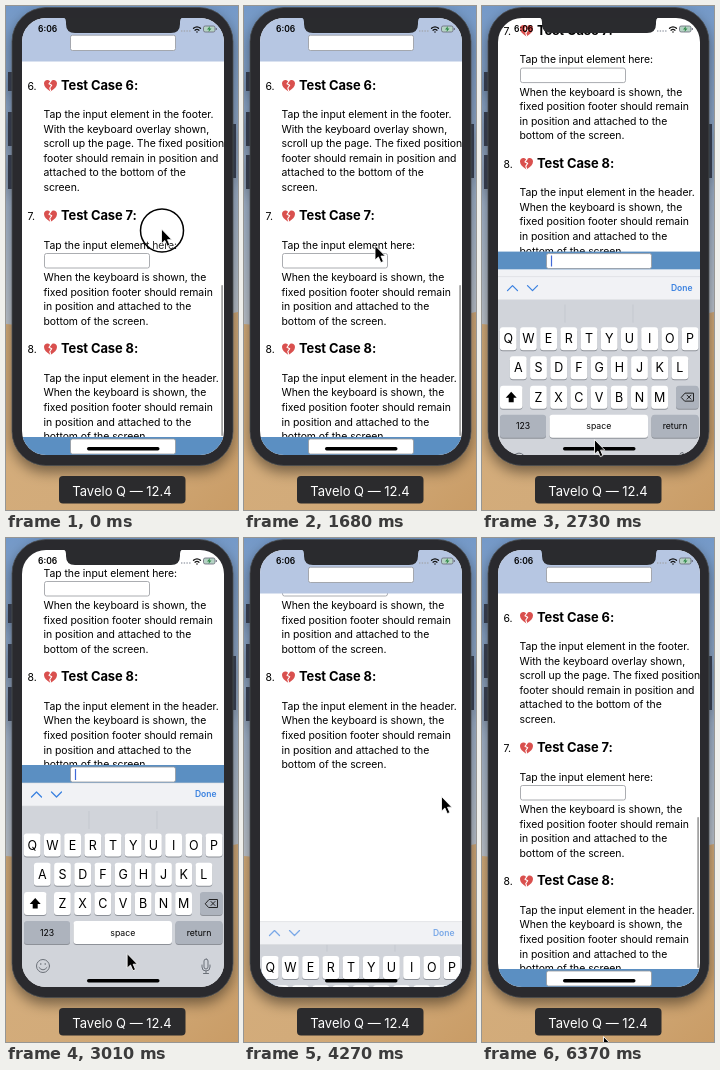
Write an HTML page that moves like this. It is 232x504 px and loops after 6.44 s.

```html
<!DOCTYPE html>
<html lang="en">
<head>
<meta charset="utf-8">
<title>Fixed footer test</title>
<style>
html, body { margin: 0; width: 100%; height: 100%; overflow: hidden; }
svg { display: block; width: 232px; height: 504px; font: 10.45px Inter, sans-serif; }
text { white-space: pre; }
#page text { letter-spacing: -.005em; }
#page .head { font-weight: 700; font-size: 12.9px; }
.field { fill: #fff; stroke: #96999e; stroke-width: .8; }
.key { fill: #fff; }
.dark { fill: #adb3bd; }
.mid { text-anchor: middle; }
.line { fill: none; stroke-linecap: round; stroke-linejoin: round; }
</style>
</head>
<body>
<svg viewBox="0 0 232 504">
  <defs>
    <linearGradient id="sky" x2="0" y2="1">
      <stop stop-color="#7499c8"/><stop offset=".45" stop-color="#98aecb"/><stop offset="1" stop-color="#c3c9d0"/>
    </linearGradient>
    <linearGradient id="sand" x2="1" y2="1">
      <stop stop-color="#d6ae7c"/><stop offset=".6" stop-color="#d2ab7a"/><stop offset="1" stop-color="#c99c66"/>
    </linearGradient>
    <filter id="shadow" x="-20%" y="-10%" width="140%" height="120%">
      <feDropShadow dx="0" dy="6" stdDeviation="7" flood-opacity=".45"/>
    </filter>
    <clipPath id="screen"><rect x="16" y="12" width="202" height="437" rx="24"/></clipPath>
  </defs>

  <rect width="232" height="330" fill="url(#sky)"/>
  <path d="M0 318Q116 330 232 306V504H0Z" fill="url(#sand)"/>
  <g filter="url(#shadow)">
    <path d="M2 66h6v19H2ZM2 106h6v34H2ZM2 149h6v34H2ZM226 118h4v54h-4Z" fill="#303746"/>
    <rect x="6" y="1.500" width="221" height="458" rx="34" fill="#2a2b2e" stroke="#4a4c50" stroke-width=".8"/>
  </g>

  <g clip-path="url(#screen)">
    <rect x="16" y="11" width="202" height="438" fill="#fff"/>
    <g id="page"></g>
    <rect id="bar" x="215.3" y="279" width="1.6" height="151" rx=".8" fill="#999"/>
    <g id="header">
      <rect x="16" y="11" width="202" height="44.5" fill="#b6c6e2"/>
      <rect class="field" x="64.5" y="29.2" width="105" height="15.3" rx="2"/>
    </g>
    <g id="footer">
      <rect x="16" y="431" width="202" height="18" fill="#5b8fc2"/>
      <rect x="16" y="449" width="202" height="22" fill="#f1f2f5"/>
      <rect class="field" id="input" x="64.5" y="433" width="105" height="15" rx="2"/>
      <path id="caret" d="M69.5 435v11" stroke="#4169d8" stroke-width="1.2"/>
    </g>
    <g id="keyboard">
      <rect x="16" y="268" width="202" height="190" fill="#d1d4da"/>
      <path d="M83 273v18M151 273v18" stroke="#bfc3ca" stroke-width=".7"/>
      <g id="keys" class="mid"></g>
      <g class="line" stroke="#6b7078">
        <circle cx="37" cy="428" r="6.5"/>
        <path d="M33 429.500q4 5 8 0M34.800 425.500v1M39.200 425.500v1M196 427v2q0 4 4 4t4-4v-2M200 433v2.500M197.500 435.500h5"/>
        <rect x="198" y="421" width="4" height="10" rx="2"/>
      </g>
      <g id="tools">
        <rect x="16" y="245" width="202" height="23" fill="#f1f2f5"/>
        <path d="M16 245h202M16 268h202" stroke="#d8dade" stroke-width=".6"/>
        <g id="actions">
          <path class="line" d="M25.500 259l5-5 5 5M45.500 254l5 5 5-5" stroke="#3b82e0" stroke-width="1.3"/>
          <text x="199.700" y="259.300" class="mid" font-size="8.5" font-weight="600" fill="#3b82e0">Done</text>
        </g>
      </g>
    </g>
    <path d="M55 11h124q-5 0-5 5v2q0 9-9 9H69q-9 0-9-9v-2q0-5-5-5Z" fill="#2a2b2e"/>
    <text x="32" y="26.200" font-size="8.500" font-weight="600">6:06</text>
    <path d="M175 25h10" stroke="#a4a9b2" stroke-width="1.3" stroke-dasharray="1.4 1.3"/>
    <path class="line" d="M187.500 22.300q3.500-3 7 0M189 24.200q2-1.700 4 0M190.900 26h.2" stroke="#111" stroke-width="1.3"/>
    <rect x="197.500" y="20" width="11.500" height="6" rx="1.700" fill="#b5d3c4" stroke="#667" stroke-width=".8"/>
    <path d="M204 20l-3 3.400h2l-.5 2.600 3-3.500h-2Z" fill="#2f8a48"/>
    <path d="M210.300 22v2" stroke="#667"/>
    <rect x="81" y="441" width="72.500" height="3.500" rx="1.700"/>
  </g>

  <rect x="53" y="470" width="126.500" height="27.500" rx="4" fill="#2b2b2d"/>
  <text x="116" y="489.500" class="mid" font-size="13" fill="#fff">Tavelo Q — 12.4</text>

  <g id="cursor">
    <circle id="ring" cy="1" r="21.500" fill="#fff" fill-opacity=".15" stroke="#000" stroke-width="1.5"/>
    <path transform="translate(-.5 .5) scale(.94)" d="M0-1V14.500L3.600 11.200 6.200 17.200 8.900 16 6.400 10.300H11Z" stroke="#fff" stroke-width=".9"/>
  </g>
</svg>
<script>
const $ = id => document.getElementById(id);
const LOOP = 6440, STEP = 70, LIFT = 204, KEYBOARD_HEIGHT = 205;

const heading = (n, y) => `<text x="21.5" y="${y + 4}">${n}.</text>
  <g transform="translate(44.500 ${y})">
    <path fill="#d9504e" d="M0 6C-4 3.500-6.500 1-6.500-2-6.500-5.800-2-6.800 0-3.500 2-6.800 6.500-5.800 6.500-2 6.500 1 4 3.500 0 6Z"/>
    <path class="line" stroke="#fff" stroke-width="1.1" d="M.5-4.500L-1.500-1.700 1.200-.3-.7 2.500.2 5.500"/>
  </g>
  <text class="head" x="55" y="${y + 4.4}">Test Case ${n}:</text>`;
const lines = (y, ...rows) => rows.map((row, i) =>
  `<text x="37.5" y="${y + i * 14.6}">${row}</text>`).join('');
const shown = ['When the keyboard is shown, the', 'fixed position footer should remain',
  'in position and attached to the', 'bottom of the screen.'];

$('page').innerHTML =
  heading(6, 79.5) + lines(112, 'Tap the input element in the footer.',
    'With the keyboard overlay shown,', 'scroll up the page. The fixed position',
    'footer should remain in position and', 'attached to the bottom of the', 'screen.') +
  heading(7, 210) + lines(242.5, 'Tap the input element here:') +
  '<rect class="field" x="38.500" y="247.500" width="105" height="14.500" rx="2"/>' +
  lines(275, ...shown) +
  heading(8, 343) + lines(375.7, 'Tap the input element in the header.', ...shown);

const key = (x, y, w, label, size, dark) =>
  `<rect x="${x}" y="${y + 1}" width="${w}" height="23" rx="3" fill="#8d9198"/>
  <rect class="key ${dark ? 'dark' : ''}" x="${x}" y="${y}" width="${w}" height="23" rx="3"/>
  <text x="${x + w / 2}" y="${y + 11.5 + size * .36}" font-size="${size}">${label}</text>`;
const row = (letters, x, y) => [...letters].map((c, i) => key(x + i * 20.2, y, 16.8, c, 12.5)).join('');

$('keys').innerHTML = row('QWERTYUIOP', 17.8, 295.5) + row('ASDFGHJKL', 27.9, 324.7) + row('ZXCVBNM', 48, 354) +
  key(18, 354, 22.5, '', 9) + key(194, 354, 22.5, '', 9, true) +
  key(18, 383, 46, '123', 8.7, true) + key(67.5, 383, 98.5, 'space', 8.7) + key(169.5, 383, 47, 'return', 8.7, true) +
  `<path d="M29.200 360l5.500 6h-3v4.500h-5V366h-3Z"/>
  <path class="line" stroke="#222" d="M199.500 365.500l3.500-4h8.500v8H203ZM205 363.500l4 4M209 363.500l-4 4"/>`;

const progress = (t, start, length) => Math.min(1, Math.max(0, (t - start) / length));
const easeOut = u => 1 - (1 - u) ** 3;
const smooth = u => u * u * (3 - 2 * u);
const shift = (id, y) => $(id).setAttribute('transform', `translate(0 ${y})`);
const show = (id, on) => $(id).setAttribute('visibility', on ? 'visible' : 'hidden');

// Pointer stops: time, x, y
const path = [[0, 156, 223.5], [1050, 141, 156], [1400, 138, 172], [2240, 113, 434], [2870, 113, 434],
  [3570, 196, 261], [3920, 196, 261], [4200, 198, 259], [5320, 198, 259], [6370, 122, 499]];
function pointer(t) {
  const i = path.findIndex(p => p[0] > t);
  if (i < 0) return path.at(-1).slice(1);
  const [a, b] = [path[i - 1], path[i]];
  const u = smooth((t - a[0]) / (b[0] - a[0]));
  return [1, 2].map(k => a[k] + (b[k] - a[k]) * u);
}

function draw(t) {
  const lift = easeOut(progress(t, 2499, 420));
  const rise = easeOut(progress(t, 2520, 420));
  const fall = easeOut(progress(t, 4160, 420));
  const settle = easeOut(progress(t, 4420, 340));
  const closing = t >= 4160;
  const fixedShift = closing ? 0 : -LIFT * lift;

  shift('page', -LIFT * (lift - settle));
  shift('header', fixedShift);
  shift('footer', fixedShift);
  shift('keyboard', KEYBOARD_HEIGHT * (1 - rise + fall));
  show('keyboard', t >= 2520 && fall < 1);
  shift('tools', 16 * Math.min(1, fall * 2));
  $('actions').setAttribute('opacity', 1 - .35 * Math.min(1, fall * 2));
  show('bar', t < 2499 || settle === 1);
  $('input').style.fill = t >= 2310 && t < 2500 ? '#b8b8b8' : '#fff';
  show('caret', t >= 2650 && t < 3640 && (t - 2650) % 1000 < 500);
  show('ring', t < 1470);
  $('cursor').setAttribute('transform', `translate(${pointer(t)})`);
}

const begin = performance.now();
function tick() {
  const t = (performance.now() - begin) % LOOP;
  draw(Math.floor(t / STEP) * STEP);
  requestAnimationFrame(tick);
}
tick();
</script>
</body>
</html>
```
